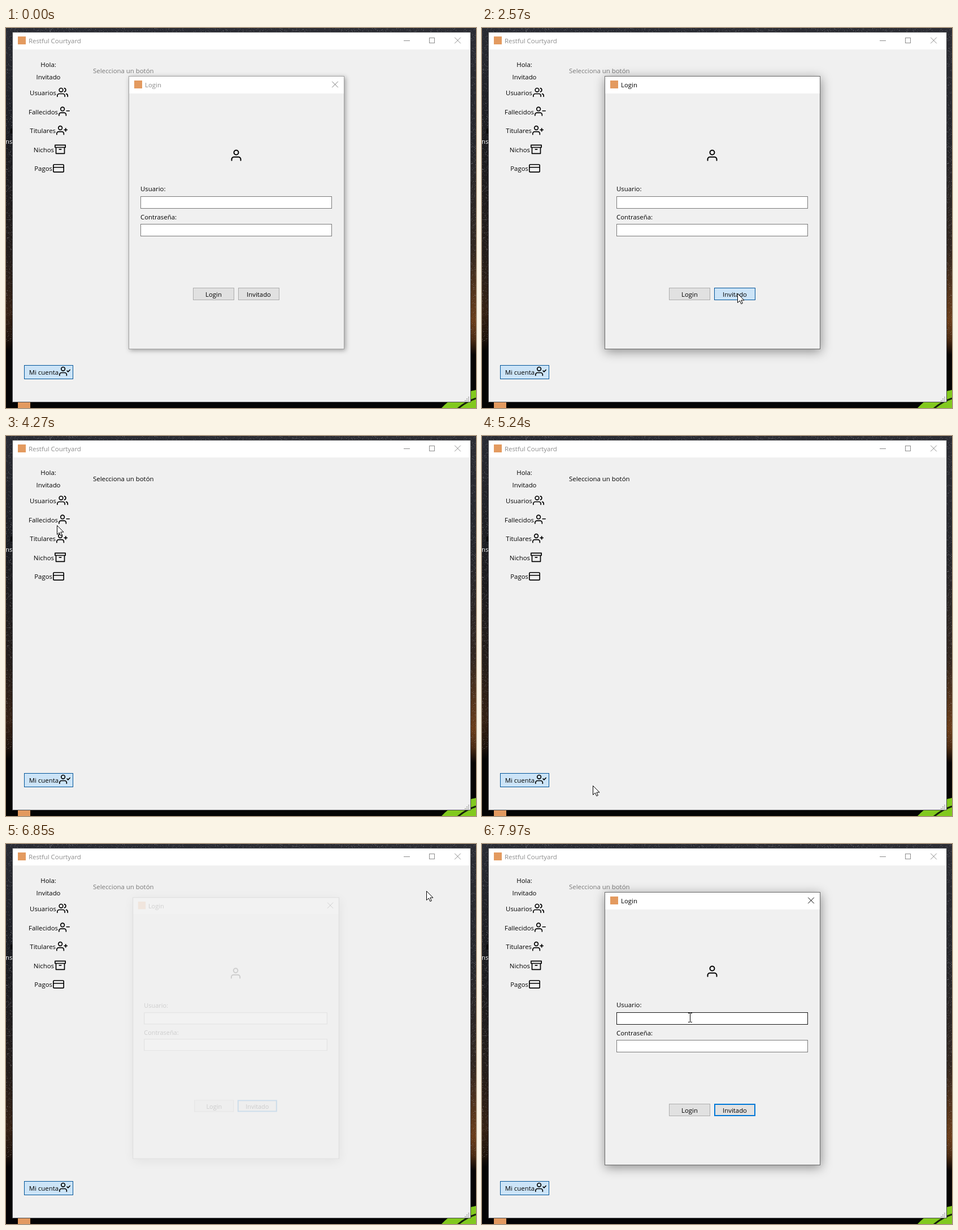
Animation of 832 by 673 pixels, one loop 8 s. Source, as an HTML page with a canvas:

```html
<!DOCTYPE html>
<html lang="es">
<head>
<meta charset="utf-8">
<style>
  html, body { margin: 0; width: 100%; height: 100%; overflow: hidden; background: #000; }
  canvas { display: block; }
</style>
</head>
<body>
<canvas id="stage" width="832" height="673"></canvas>
<script>
const LOOP = 8000;
const ctx = document.getElementById('stage').getContext('2d');
const FACE = '#f0f0f0', BLUE = '#0078d7', NAVY = '#005499', LOGO = '#e39a5f', DIM = '#787878';
const FONT = '11.4px "Open Sans", "Noto Sans", sans-serif';

// Line icons on a 24 unit grid
const head = x => `M${x + 4} 7a4 4 0 1 1-8 0a4 4 0 1 1 8 0`;
const person = 'M16 21v-2a4 4 0 0 0-4-4H5a4 4 0 0 0-4 4v2' + head(8.5);
const ICONS = {
  user: 'M20 21v-2a4 4 0 0 0-4-4H8a4 4 0 0 0-4 4v2' + head(12),
  users: 'M17 21v-2a4 4 0 0 0-4-4H5a4 4 0 0 0-4 4v2' + head(9) +
    'M23 21v-2a4 4 0 0 0-3-3.87M16 3.13a4 4 0 0 1 0 7.75',
  minus: person + 'M23 11h-6',
  plus: person + 'M20 8v6M23 11h-6',
  check: person + 'M17 11l2 2 4-4',
  archive: 'M21 8v13H3V8M1 3h22v5H1zM10 12h4',
  card: 'M3 4h18a2 2 0 0 1 2 2v12a2 2 0 0 1-2 2H3a2 2 0 0 1-2-2V6a2 2 0 0 1 2-2zM1 10h22'
};
const ARROW = new Path2D('M.5.5v16l3.8-3.5 2.5 5.6 2.5-1.1-2.5-5.4h5.2z');

// Pointer stops: time, x, y
const TRACK = [
  [70, 709, 628], [830, 388, 306], [970, 388, 306], [1170, 388, 349], [1660, 418, 440],
  [1800, 418, 440], [2300, 458, 483], [2570, 452, 470], [2930, 452, 470], [3740, 82, 122],
  [3760, 82, 122], [3810, 78, 114], [4200, 78, 114], [4270, 90, 158], [4410, 492, 595],
  [4750, 447, 639], [5520, 89, 611], [5800, 94, 602], [5870, 94, 602], [6400, 755, 78],
  [6640, 750, 76], [6850, 744, 83], [7200, 755, 430], [7270, 761, 443], [7900, 368, 307]
];

const within = (t, a, b) => t >= a && t < b;
const clamp = v => Math.max(0, Math.min(1, v));

function pointerAt(t) {
  if (t < 70 || within(t, 4470, 4750)) return null;
  const i = TRACK.findIndex(k => k[0] > t);
  if (i < 0) return TRACK[TRACK.length - 1].slice(1);
  const [t0, x0, y0] = TRACK[i - 1], [t1, x1, y1] = TRACK[i];
  const p = (t - t0) / (t1 - t0), e = p * p * (3 - 2 * p);
  return [Math.round(x0 + (x1 - x0) * e), Math.round(y0 + (y1 - y0) * e)];
}

function fill(x, y, w, h, color) {
  ctx.fillStyle = color;
  ctx.fillRect(x, y, w, h);
}

// Outer pixel bounds, with the border drawn inside them
function box(x, y, w, h, color, border, line = 1) {
  fill(x, y, w, h, color);
  ctx.strokeStyle = border;
  ctx.lineWidth = line;
  ctx.strokeRect(x + line / 2, y + line / 2, w - line, h - line);
}

function text(s, x, y, color = '#000', align = 'left') {
  ctx.font = FONT;
  ctx.textAlign = align;
  ctx.fillStyle = color;
  ctx.fillText(s, x, y);
}

function stroke(d, x, y, color, line = 1, scale = 1) {
  ctx.save();
  ctx.translate(x, y);
  ctx.scale(scale, scale);
  ctx.lineWidth = line;
  ctx.lineCap = ctx.lineJoin = 'round';
  ctx.strokeStyle = color;
  ctx.stroke(new Path2D(d));
  ctx.restore();
}

function icon(name, x, cy, size = 20) {
  stroke(ICONS[name], x, cy - size / 2, '#000', 2, size / 24);
}

const cross = (x, y, color) => stroke('M0 0l10 10M10 0l-10 10', x, y, color);

function button(label, x, y, state) {
  const [color, border, line] = {
    plain: ['#e1e1e1', '#adadad', 1],
    main: ['#e1e1e1', BLUE, 2],
    hover: ['#e5f1fb', BLUE, 1],
    down: ['#cce4f7', NAVY, 1]
  }[state];
  box(x, y, 73, 22, color, border, line);
  text(label, x + 36.5, y + 16, '#000', 'center');
}

// Shadow only outside the rectangle, so a fading dialog stays clear
function shadow(x, y, w, h, color, blur, dx, dy) {
  ctx.save();
  const outside = new Path2D();
  outside.rect(0, 0, 832, 673);
  outside.rect(x, y, w, h);
  ctx.clip(outside, 'evenodd');
  ctx.shadowColor = color;
  ctx.shadowBlur = blur;
  ctx.shadowOffsetX = dx;
  ctx.shadowOffsetY = dy;
  fill(x, y, w, h, FACE);
  ctx.restore();
}

// Night sky, drawn once
const sky = document.createElement('canvas');
sky.width = 832;
sky.height = 673;
(function paintSky(c) {
  const strip = (x, w, stops) => {
    const g = c.createLinearGradient(0, 0, 0, 673);
    stops.forEach(([at, color]) => g.addColorStop(at, color));
    c.fillStyle = g;
    c.fillRect(x, 0, w, 673);
  };
  strip(0, 416, [[0, '#292b33'], [.3, '#1b1c20'], [.6, '#241d1a'], [.75, '#352114'],
    [.82, '#1d120b'], [.85, '#050404'], [1, '#040404']]);
  strip(416, 416, [[0, '#2b2c33'], [.3, '#26272b'], [.58, '#31261f'], [.77, '#6a3d19'],
    [.82, '#4a2a12'], [.86, '#080504'], [1, '#040404']]);
  let seed = 7;
  const rnd = () => (seed = seed * 16807 % 2147483647) / 2147483647;
  for (let i = 0; i < 110000; i++) {
    c.fillStyle = `rgba(175,175,185,${rnd() ** 3 * .45})`;
    c.fillRect(rnd() * 832 | 0, rnd() * 555 | 0, 1, 1);
  }
  c.fillStyle = '#000';
  c.fillRect(8, 178, 4, 9);
  c.fillStyle = LOGO;
  c.fillRect(21, 660, 22, 13);
  c.fillStyle = '#82c91e';
  c.fill(new Path2D('M771 673Q794 648 832 641V673z'));
  c.strokeStyle = '#16210a';
  c.lineWidth = 3;
  c.stroke(new Path2D('M800 674Q814 662 832 656'));
  c.font = FONT;
  c.fillStyle = '#fff';
  c.fillText('ns', -1, 205);
})(sky.getContext('2d'));

function drawWindow(active) {
  const ink = active ? '#000' : '#8c8c8c';
  box(11, 7, 812, 656, FACE, '#4c4d50');
  fill(12, 8, 810, 30, '#fff');
  fill(21, 15, 14, 14, LOGO);
  text('Restful Courtyard', 40, 27, ink);
  fill(704, 22, 11, 1, ink);
  ctx.strokeStyle = ink;
  ctx.lineWidth = 1;
  ctx.strokeRect(749.5, 17.5, 9, 9);
  cross(794.5, 17, ink);
  for (let i = 0; i < 3; i++)
    for (let j = 0; j <= i; j++) fill(818 - j * 3, 653 + i * 3, 2, 2, '#b4b4b4');

  text('Hola:', 75, 69, '#000', 'center');
  text('Invitado', 75, 91, '#000', 'center');
  [['Usuarios', 'users', 90], ['Fallecidos', 'minus', 93], ['Titulares', 'plus', 89],
    ['Nichos', 'archive', 86], ['Pagos', 'card', 83]].forEach(([label, name, x], i) => {
    const cy = 114 + i * 33.6;
    text(label, x - 1, Math.round(cy) + 5, '#000', 'right');
    icon(name, x, cy);
  });
  box(32, 597, 87, 25, '#cce4f7', NAVY);
  text('Mi cuenta', 93, 614, '#000', 'right');
  icon('check', 94, 608);
}

function drawAccount(t) {
  text('Mi cuenta', 154, 82);
  button('Logout', 721, 66, within(t, 6570, 6680) ? 'down' : 'hover');
  text('Nombre de usuario:', 154, 130);
  text('Invitado', 264, 130);
  box(368, 151, 213, 473, FACE, '#828790');
  text('Cambiar contraseña:', 474.5, 174, DIM, 'center');
  ['Contraseña actual:', 'Nueva contraseña:', 'Repetir contraseña:'].forEach((label, i) => {
    const y = 215 + Math.round(i * 49.5);
    text(label, 378, y, DIM);
    box(378, y + 9, 193, 22, FACE, '#cccccc');
  });
  box(389, 581, 171, 22, '#cccccc', '#bfbfbf');
  text('Cambiar contraseña', 474, 597, DIM, 'center');
}

function drawDialog(t, show, pointer) {
  const active = t >= 970;
  const over = (x, y, w, h) => pointer && pointer[0] > x && pointer[0] < x + w &&
    pointer[1] > y && pointer[1] < y + h;
  const scale = .95 + .05 * show;
  ctx.save();
  ctx.globalAlpha = show;
  ctx.translate(385, 305);
  ctx.scale(scale, scale);
  ctx.translate(-385, -305);

  if (active) shadow(217, 85, 382, 484, 'rgba(0,0,0,.42)', 18, 1, 4);
  else shadow(217, 85, 382, 484, 'rgba(0,0,0,.35)', 8, 2, 2);
  box(217, 85, 382, 484, FACE, active ? '#6a6a6a' : '#a0a0a0');
  fill(218, 86, 380, 30, '#fff');
  fill(227, 93, 14, 14, LOGO);
  text('Login', 246, 105, active ? '#000' : '#8c8c8c');
  if (!within(t, 2540, 2800)) cross(577.5, 95, active ? '#000' : '#7c7c7c');
  icon('user', 395.5, 225.5, 24);

  const typing = within(t, 970, 2430);
  const edge = y => over(238, y + 3, 339, 17) ? '#171717' : '#7a7a7a';
  text('Usuario:', 238, 289);
  box(238, 298, 339, 22, '#fff', typing ? BLUE : edge(298));
  if (typing && (t - 970) % 1060 < 530) fill(241, 301, 1, 16, '#000');
  text('Contraseña:', 238, 339);
  box(238, 347, 339, 22, '#fff', edge(347));

  const chosen = t >= 2430;
  const hovered = over(411, 460, 73, 22);
  button('Login', 331, 460, over(331, 460, 73, 22) ? 'hover' : active && !chosen && !hovered ? 'main' : 'plain');
  button('Invitado', 411, 460, within(t, 2430, 2800) ? 'down' : hovered ? 'hover' : chosen ? 'main' : 'plain');
  ctx.restore();
}

function drawPointer([x, y], beam) {
  if (beam) {
    fill(x, y - 7, 1, 15, '#000');
    for (const dy of [-8, 8]) {
      fill(x - 3, y + dy, 3, 1, '#000');
      fill(x + 1, y + dy, 3, 1, '#000');
    }
    return;
  }
  ctx.save();
  ctx.translate(x, y);
  ctx.fillStyle = '#fff';
  ctx.fill(ARROW);
  ctx.strokeStyle = '#000';
  ctx.lineWidth = 1;
  ctx.stroke(ARROW);
  ctx.restore();
}

function draw(t) {
  const pointer = pointerAt(t);
  const show = t < 4000 ? clamp((2770 - t) / 170) : clamp((t - 6818) / 230);
  ctx.drawImage(sky, 0, 0);
  drawWindow(within(t, 5560, 6680));
  if (within(t, 5620, 6680)) drawAccount(t);
  else text('Selecciona un botón', 154, 80, within(t, 2640, 5620) ? '#000' : DIM);
  if (show) drawDialog(t, show, pointer);
  if (!pointer) return;
  const [x, y] = pointer;
  const beam = show > .5 && within(x, 238, 577) && (within(y, 298, 320) || within(y, 347, 369));
  drawPointer(pointer, beam);
}

const start = performance.now();
function tick() {
  draw((performance.now() - start) % LOOP);
  requestAnimationFrame(tick);
}
tick();
</script>
</body>
</html>
```
